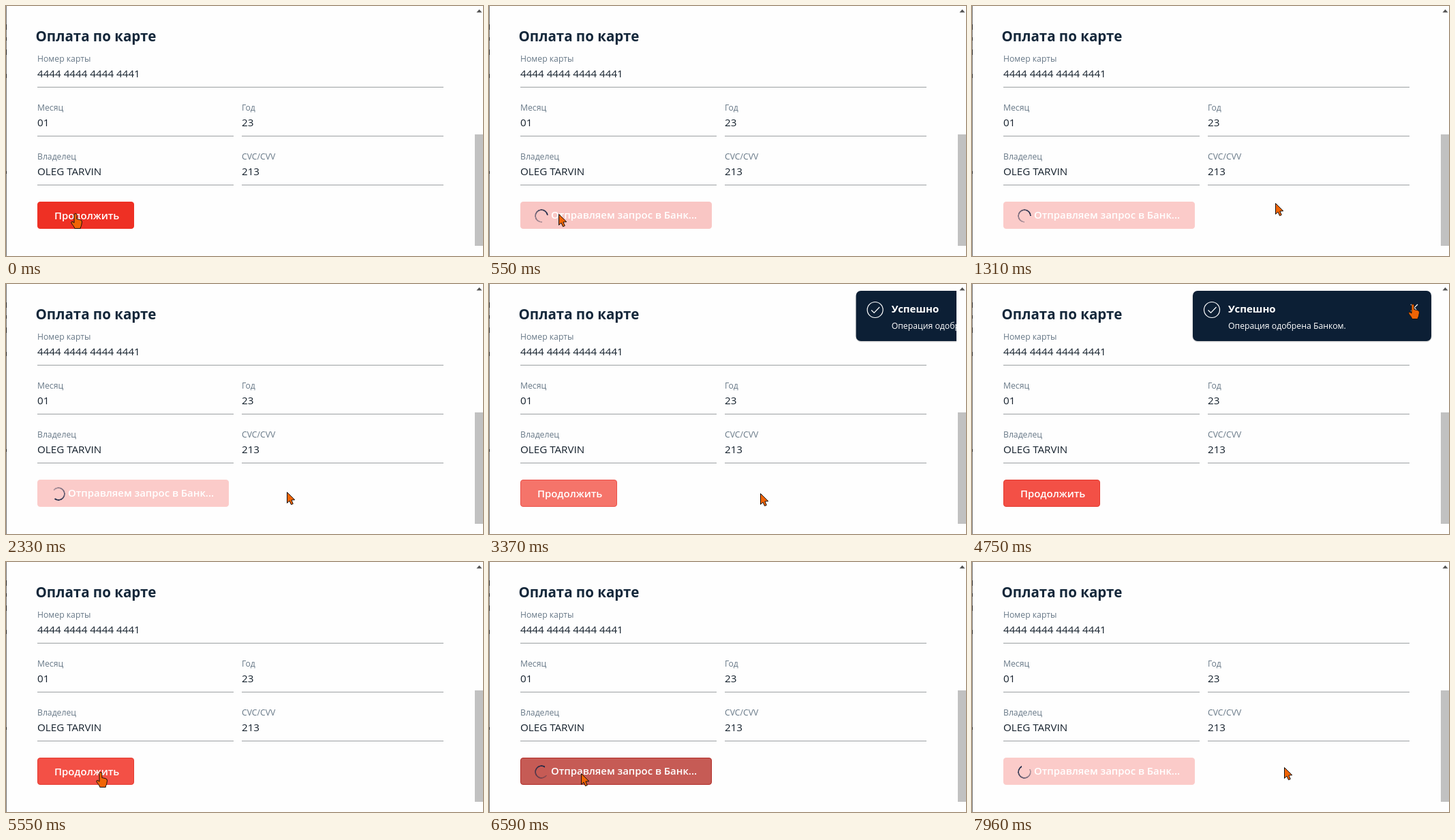
These frames come from a looping animation (700 by 368 pixels, 7.99 s). An HTML page:

```html
<!DOCTYPE html>
<html lang="ru">
<head>
<meta charset="utf-8">
<title>Оплата по карте</title>
<style>
  html, body { margin: 0; width: 100%; height: 100%; overflow: hidden; background: #fefefe; }
  svg { display: block; font-family: "Open Sans", "Noto Sans", sans-serif; }
  .title { font-size: 20.5px; font-weight: 700; fill: #14273a; }
  .label { font-size: 12.2px; fill: #667786; }
  .value { font-size: 15.2px; fill: #14202c; }
  .action { font-size: 14.9px; font-weight: 600; fill: #fff; }
  .lines { stroke: #9b9fa2; }
  .marks { stroke: #222; }
  #spinner {
    position: absolute; left: 67px; top: 299px; width: 20px; height: 20px; border-radius: 50%;
    background: conic-gradient(transparent 25%, rgba(28, 40, 70, .3) 25%, #1c2846);
    -webkit-mask: radial-gradient(circle, transparent 7.6px, #000 8.2px);
    mask: radial-gradient(circle, transparent 7.6px, #000 8.2px);
  }
  #pointer { position: absolute; left: 0; top: 0; }
</style>
</head>
<body>
<svg width="700" height="368" viewBox="0 0 700 368">
  <path d="M.5 0V368" stroke="#777"/>
  <path class="marks" d="M.5 27v8M.5 46v5M.5 64v8M.5 100v6M.5 243v4"/>
  <rect x="688" y="189" width="12" height="164" fill="#c1c1c1"/>
  <path d="M690.5 9.500h8l-4-4.500z" fill="#505050"/>

  <text class="title" x="43.500" y="52">Оплата по карте</text>
  <g id="fields"></g>
  <path class="lines" d="M46 119.500H642M46 191.500H334M346 191.500H642M46 263.500H334M346 263.500H642"/>

  <rect id="button" x="46.500" y="288.500" height="39" rx="3.500"/>
  <text id="caption" class="action"></text>

  <svg width="686" height="368">
    <g id="toast">
      <rect y="12" width="350" height="74" rx="8" fill="#000" opacity=".08"/>
      <rect x="-1" y="11" width="352" height="74" rx="8" fill="#000" opacity=".1"/>
      <rect y="10" width="350" height="74" rx="7" fill="#0c1f35"/>
      <g fill="none" stroke="#fff" stroke-width="1.200">
        <circle cx="28" cy="38" r="11.500"/>
        <path d="M22.500 38.500l4 4 8-8.500M320 30l10 10M330 30l-10 10"/>
      </g>
      <text x="52" y="42" fill="#fff" font-size="15" font-weight="700">Успешно</text>
      <text x="52" y="66" fill="#fff" font-size="12.250">Операция одобрена Банком.</text>
    </g>
  </svg>
</svg>
<div id="spinner"></div>
<svg id="pointer" width="700" height="368">
  <g id="cursor" fill="#f06405" stroke="#17120e" stroke-linejoin="round">
    <path id="arrow" d="M.5 .5V16.500L4 13.200 6.500 18.700 9.300 17.500 6.900 12 11.800 11.700z"/>
    <path id="hand" d="M-2 11V1.500a1.900 1.900 0 0 1 3.800 0V7.500l5.300 1.200q2.600.7 2.400 3.400l-.8 4.400q-.3 2-1.400 3.400V21.500H-1.200l-.8-2q-1-2-3-4.300-2.100-2.600-.7-3.600 1.500-.9 3.700 1.600z"/>
  </g>
</svg>

<script>
const LOOP = 7990;
const $ = id => document.getElementById(id);
const smooth = p => p * p * (3 - 2 * p);
const ramp = (t, a, b) => Math.min(1, Math.max(0, (t - a) / (b - a)));

// Rows are [time, ...values]; interpolate between neighbouring rows.
function track(rows, t, ease = p => p) {
  let i = 0;
  while (i < rows.length - 2 && t >= rows[i + 1][0]) i++;
  const [a, b] = [rows[i], rows[i + 1]];
  const p = ease(ramp(t, a[0], b[0]));
  return a.slice(1).map((v, k) => v + (b[k + 1] - v) * p);
}

const fields = [
  [46, 0, 'Номер карты', '4444 4444 4444 4441'],
  [46, 72, 'Месяц', '01'],
  [346, 72, 'Год', '23'],
  [46, 144, 'Владелец', 'OLEG TARVIN'],
  [346, 144, 'CVC/CVV', '213']
];
$('fields').innerHTML = fields.map(([x, y, label, value]) =>
  `<text class="label" x="${x}" y="${y + 82}">${label}</text>
   <text class="value" x="${x}" y="${y + 105}">${value}</text>`).join('');

const path = [
  [0, 102, 306], [600, 102, 306], [1050, 455, 296], [1450, 441, 287], [1880, 424, 298],
  [2330, 412, 306], [2700, 405, 308], [3400, 398, 308], [3920, 398, 308], [4440, 636, 8],
  [4540, 647, 30], [4870, 647, 30], [5390, 124, 319], [5490, 143, 309], [5610, 135, 311],
  [6680, 135, 311], [7240, 456, 299], [7600, 456, 299], [7960, 458, 302]
];

// Button states: fill followed by border.
const idle = [238, 48, 36, 238, 48, 36];
const focus = [243, 80, 70, 229, 58, 47];
const pressed = [196, 40, 30, 170, 30, 24];
const fading = [198, 90, 84, 176, 42, 38];
const pale = [249, 198, 196, 249, 198, 196];
const disabled = [251, 203, 201, 251, 203, 201];
const press = (t, from) => [
  [t, ...from], [t + 90, ...pressed], [t + 140, ...fading], [t + 280, ...pale], [t + 340, ...disabled]
];
const shades = [
  [0, ...idle], ...press(270, idle), [3255, ...disabled],
  [3370, 245, 117, 107, 236, 80, 72], [3430, ...focus],
  ...press(6450, focus), [LOOP, ...disabled]
];

function draw(t) {
  const again = t >= 6550;
  const busy = again || (t >= 370 && t < 3255);

  const shade = track(shades, t);
  $('button').setAttribute('fill', `rgb(${shade.slice(0, 3)})`);
  $('button').setAttribute('stroke', `rgb(${shade.slice(3)})`);
  $('button').setAttribute('width', busy ? 280 : 141);
  $('caption').textContent = busy ? 'Отправляем запрос в Банк...' : 'Продолжить';
  $('caption').setAttribute('x', busy ? 91 : 71);
  $('caption').setAttribute('y', busy ? 313 : 314);

  // One turn takes 750 ms; the conic gradient starts at twelve o'clock.
  const angle = 90 + (again ? (t - 6590) * .48 - 55 : (t - 550) * .48 - 5);
  $('spinner').style.display = busy ? 'block' : 'none';
  $('spinner').style.transform = `rotate(${angle}deg)`;

  const toastX = 686 - 362 * smooth(ramp(t, 3255, 3520));
  const alpha = t < 3255 ? 0 : 1 - ramp(t, 4870, 5100);
  $('toast').setAttribute('transform', `translate(${toastX})`);
  $('toast').setAttribute('opacity', alpha);

  const [x, y] = track(path, t, smooth);
  const onButton = !busy && x > 46 && x < 188 && y > 288 && y < 328;
  const onClose = alpha > 0 && x > 638 && x < 660 && y > 24 && y < 46;
  const hover = onButton || onClose;
  $('cursor').setAttribute('transform', `translate(${Math.round(x)} ${Math.round(y)})`);
  $('hand').setAttribute('visibility', hover ? 'visible' : 'hidden');
  $('arrow').setAttribute('visibility', hover ? 'hidden' : 'visible');
}

const start = performance.now();
function tick() {
  draw((performance.now() - start) % LOOP);
  requestAnimationFrame(tick);
}
tick();
</script>
</body>
</html>
```
